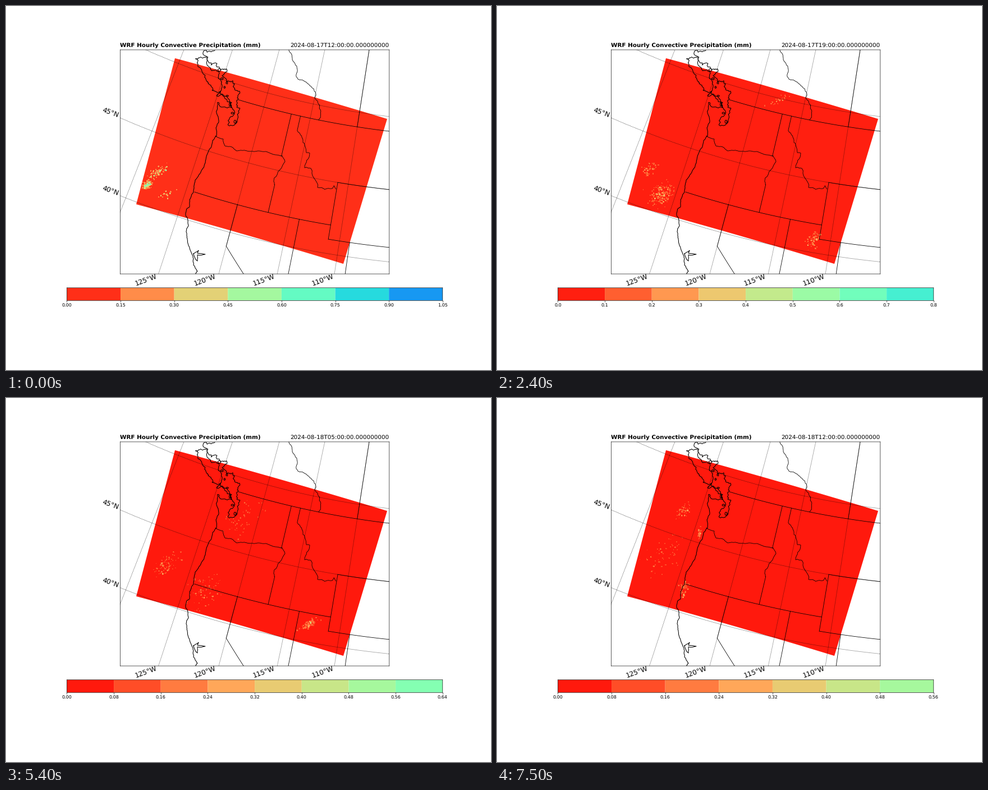
These frames come from a looping animation (864x648 px, 7.8 s). A matplotlib script:

```python
import numpy as np
import matplotlib as mpl
import matplotlib.pyplot as plt
from matplotlib.animation import FuncAnimation
from matplotlib.ticker import MaxNLocator

mpl.rcParams.update({"text.hinting": "none", "path.snap": False})

W, H = 864, 648
LEFT, RIGHT, TOP, BOTTOM = 203.4, 682.8, 78, 477
BAR_L, BAR_R, BAR_T, BAR_B = 108.4, 777.8, 501.7, 524.4
CONE = 0.6305              # Lambert conformal, parallels 33N and 45N
POLE_X, POLE_Y = 863, -1313
VMAX = 1.225

# Model grid: size, corners on the stage, and the upward bow of its rows
NX, NY = 240, 165
NW, NE, SE, SW = np.array([(301, 93), (679, 201), (601, 459), (232, 353)], float)
BOW = 1.6 * np.array([0.275, -0.961])


def project(lon, lat):
    tan = np.tan(np.pi / 4 + np.radians(lat) / 2)
    rho = 1649.7 * (np.tan(np.radians(67.5)) / tan) ** CONE
    th = np.radians(CONE * (lon + 96))
    return POLE_X + rho * np.sin(th), POLE_Y + rho * np.cos(th)


def roughen(pts, amp, seed):
    """Midpoint displacement until every step is short."""
    rng = np.random.default_rng(seed)
    p = np.array(pts, float)
    while np.hypot(*np.diff(p, axis=0).T).max() > 5:
        d = np.diff(p, axis=0)
        push = np.c_[-d[:, 1], d[:, 0]] * rng.normal(0, amp, (len(d), 1))
        out = np.empty((2 * len(p) - 1, 2))
        out[::2], out[1::2] = p, (p[:-1] + p[1:]) / 2 + push
        p = out
    return p


# ---- figure -------------------------------------------------------------
fig = plt.figure(figsize=(15, 11.25), dpi=57.6, facecolor="white")
ax = fig.add_axes([LEFT / W, 1 - BOTTOM / H, (RIGHT - LEFT) / W, (BOTTOM - TOP) / H])
bar = fig.add_axes([BAR_L / W, 1 - BAR_B / H, (BAR_R - BAR_L) / W, (BAR_B - BAR_T) / H])
ax.set(xlim=(LEFT, RIGHT), ylim=(BOTTOM, TOP), xticks=[], yticks=[])
ax.set_autoscale_on(False)
ax.set_title("WRF Hourly Convective Precipitation (mm)", loc="left",
             fontsize=13, fontweight="bold")
stamp = ax.set_title("", loc="right", fontsize=13)


def line(x, y, lw=1.0, ls="-"):
    ax.plot(x, y, color="black", lw=lw, ls=ls, zorder=3)


def meridian(lon, south, north, **kw):
    line(*project(lon, np.linspace(south, north, 60)), **kw)


def parallel(lat, west, east, **kw):
    line(*project(np.linspace(west, east, 60), lat), **kw)


def label(x, y, text, tilt):
    fig.text(x / W, 1 - y / H, text, fontsize=15, rotation=tilt,
             ha="center", va="center")


# ---- graticule ----------------------------------------------------------
for lon in range(-130, -109, 5):
    meridian(lon, 33, 56, ls=":")
for lat in (40, 45, 50):
    parallel(lat, -140, -100, ls=":")
for i in range(4):
    label(249.5 + 105 * i, 489, f"{125 - 5 * i}°W", 20)
for i in range(2):
    label(185.5, 191 + 139 * i, f"{45 - 5 * i}°N", -20)

# ---- straight borders ---------------------------------------------------
for args in [(-110, 49, 56), (-117.03, 46, 49), (-117.03, 42, 44), (-120, 39, 42),
             (-114.04, 36, 42), (-116.05, 48, 49), (-111.05, 41, 45), (-109.05, 36, 41)]:
    meridian(*args)
for args in [(49, -122.76, -100), (45, -111.05, -102),
             (42, -124.2, -111.05), (41, -111.05, -102)]:
    parallel(*args)
line(*project(np.linspace(-120, -114.63, 9), np.linspace(39, 35, 9)))

# ---- rivers, ridges and shores through a few key points -----------------
rockies = [(557, 203), (550, 163), (537, 138), (518, 107), (510, 95), (502, 76)]
bitterroot = [(519, 222), (529, 243), (535, 261), (541, 262), (532, 288), (543, 289),
              (555, 323), (581, 325), (584, 320), (588, 326)]
columbia = [(373, 231), (387, 237), (390, 249), (411, 258), (466, 260), (492, 267)]
snake = [(492, 267), (497, 277), (478, 306), (478, 318)]
pacific = [(377, 172), (375, 190), (379, 206), (374, 217), (375, 231), (366, 250),
           (352, 288), (337, 310), (334, 331), (327, 357), (320, 369), (325, 390),
           (321, 402), (328, 434), (334, 450), (334, 461), (341, 472), (337, 478)]
bay = [(334, 441), (343, 435), (341, 440), (355, 442), (341, 443), (341, 454), (334, 441)]
island = [(338, 94), (343, 92), (358, 104), (380, 120), (385, 142), (402, 172),
          (402, 181), (375, 160), (382, 152), (367, 150), (357, 133), (348, 113), (338, 94)]
mainland = [(372, 79), (354, 79), (358, 94), (370, 102), (382, 113), (393, 112),
            (385, 124), (394, 139), (404, 133), (406, 145), (413, 152), (414, 165),
            (411, 180), (413, 195), (403, 213), (396, 210), (407, 192), (404, 183),
            (385, 180), (377, 172)]
for path, amp, lw in [(rockies, .11, 1), (bitterroot, .11, 1), (columbia, .05, 1),
                      (snake, .06, 1), (pacific, .06, 1.3), (bay, .08, 1.3),
                      (island, .16, 1.3), (mainland, .2, 1.3)]:
    line(*roughen(path, amp, len(path)).T, lw=lw)

rng = np.random.default_rng(5)
turn = np.linspace(0, 2 * np.pi, 8)
for f in np.linspace(0, 1, 7):          # islets along the strait
    r = rng.uniform(1.2, 3, 2)
    line(380 + 28 * f + r[0] * np.cos(turn), 114 + 92 * f + r[1] * np.sin(turn), lw=1.3)

# ---- model grid ---------------------------------------------------------
TWIST = NW + SE - NE - SW
TO_GRID = np.linalg.inv(np.column_stack([NE - NW, SW - NW]))


def to_stage(s, t):
    s, t = s[..., None], t[..., None]
    return (NW + s * (NE - NW) + t * (SW - NW) + s * t * TWIST
            + 4 * s * (1 - s) * BOW)


def to_cells(xy):
    st = (xy - NW) @ TO_GRID.T
    st = (xy - NW - np.outer(st.prod(axis=1), TWIST)) @ TO_GRID.T
    return np.rint(st * [NX - 1, NY - 1]).astype(int).T


GX, GY = np.moveaxis(to_stage(*np.meshgrid(np.linspace(0, 1, NX),
                                           np.linspace(0, 1, NY))), -1, 0)
f = np.linspace(0, 1, 40)
rim = np.vstack([to_stage(f, 0 * f), to_stage(f[::-1], 0 * f + 1)])
domain = plt.Polygon(rim, lw=0, zorder=1)
ax.add_patch(domain)

# ---- showers: peak hour, x, y, spread x, spread y, cells ----------------
SHOWERS = [
    (0, 251, 319, 4, 3, 110), (0, 270, 296, 9, 4, 65), (0, 283, 336, 8, 3, 16),
    (4, 288, 338, 8, 4, 80), (4, 264, 320, 7, 12, 25), (6, 503, 169, 11, 3, 40),
    (7, 272, 290, 7, 5, 40), (7, 293, 335, 10, 10, 130), (7, 566, 415, 7, 7, 60),
    (13, 345, 324, 6, 13, 210), (13, 395, 280, 9, 12, 45), (13, 540, 412, 20, 12, 75),
    (17, 284, 298, 12, 10, 75), (17, 417, 218, 14, 14, 45), (17, 355, 345, 15, 14, 70),
    (17, 538, 405, 8, 3, 90), (20, 345, 328, 7, 8, 45), (20, 547, 402, 6, 3, 40),
    (24, 333, 202, 7, 6, 45), (24, 360, 243, 1.5, 5, 30), (24, 295, 280, 17, 14, 60),
    (24, 331, 342, 4, 7, 65)]
SPAN = 3.5                              # hours a shower takes to grow or fade
DRIFT = np.array([2.0, -1.0])           # stage pixels per hour
TILT = -0.5

# Heaviest rain of each hour, in mm
PEAK = [1.0, 1.15, 1.15, .75, .85, .6, .6, .75, 1.15, 1.15, 1.15, 1.3, 1.15,
        1.15, .75, .5, .5, .6, .6, .75, .5, .6, .75, .41, .5]
LOCATOR = MaxNLocator(8, min_n_ticks=1)


def rain(hour, step):
    rng = np.random.default_rng(100 + hour)
    power = np.zeros((NY, NX))
    for peak_hour, x, y, sx, sy, count in SHOWERS:
        age = hour - peak_hour
        n = int(count * max(0, 1 - abs(age) / SPAN))
        dx, dy = rng.normal(0, 1, (2, n))
        xy = np.c_[x + sx * dx, y + sy * dy + TILT * sx * dx] + DRIFT * age
        col, row = to_cells(xy)
        amount = step * (1.1 + rng.exponential(.6, n))
        ok = (col > 0) & (col < NX - 1) & (row > 0) & (row < NY - 1)
        np.add.at(power, (row[ok], col[ok]), amount[ok] ** 2)
    return np.minimum(np.sqrt(power), PEAK[hour])


shown = []


def reset():
    while shown:
        shown.pop().remove()
    return []


def draw(k):
    reset()
    hour = max(0, k - 1)
    levels = LOCATOR.tick_values(0, PEAK[hour])
    step, n = round(levels[1], 3), len(levels) - 1
    colors = mpl.colormaps["rainbow_r"]((levels[:-1] + step / 2) / VMAX)

    day, clock = divmod(12 + hour, 24)
    stamp.set_text(f"2024-08-{17 + day}T{clock:02d}:00:00.000000000")
    domain.set_facecolor(colors[0])
    shown.append(ax.contourf(GX, GY, rain(hour, step), levels[1:],
                             colors=colors[1:], zorder=2))

    bar.clear()
    bar.bar(np.arange(n), 1, width=1, align="edge", color=colors, lw=0)
    bar.set(xlim=(0, n), ylim=(0, 1), yticks=[])
    digits = 1 if step in (.1, .2) else 2
    bar.set_xticks(range(n + 1), [f"{v:.{digits}f}" for v in levels], fontsize=10)
    return []


anim = FuncAnimation(fig, draw, frames=26, interval=300, init_func=reset,
                     repeat=True, repeat_delay=0, blit=False)
plt.show()
```
